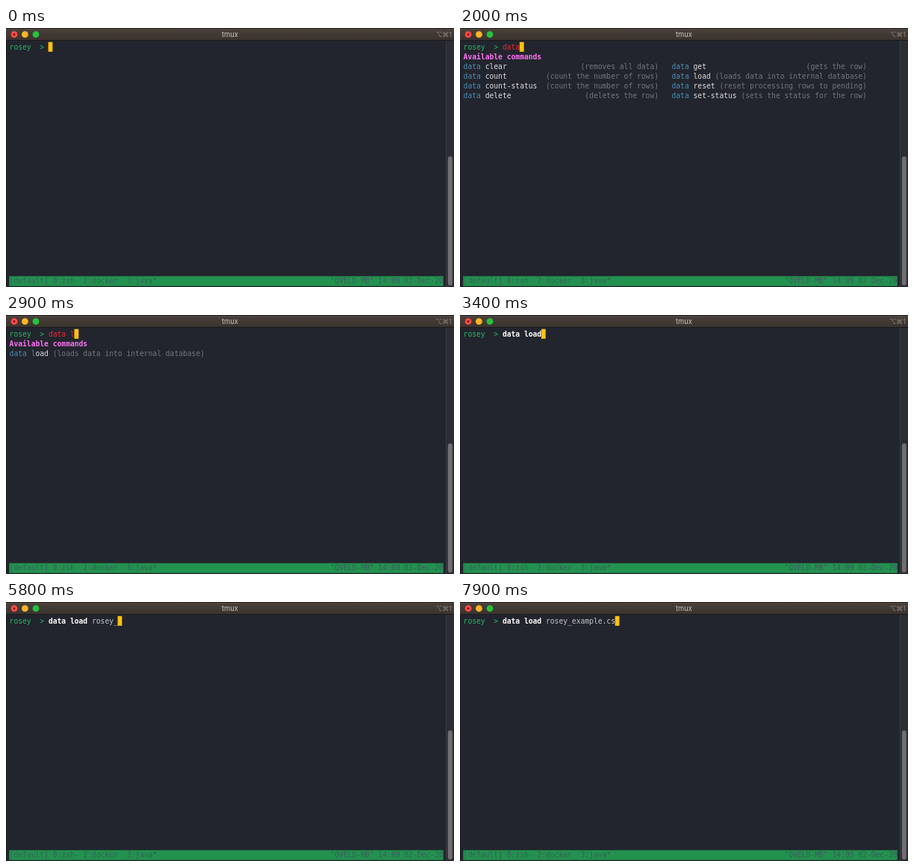
Animation, 600 px wide and 347 px high, one loop 8 s. Source, as an HTML page with a canvas:

```html
<!DOCTYPE html>
<html lang="en">
<head>
<meta charset="utf-8">
<title>Terminal</title>
<style>
  html, body { margin: 0; width: 100%; height: 100%; overflow: hidden; background: #22252d; }
  canvas { display: block; width: 600px; height: 347px; }
</style>
</head>
<body>
<canvas id="stage"></canvas>
<script>
const W = 600, H = 347, LOOP = 8000;
const LEFT = 4.6, TOP = 19, CELL_W = 5.81, CELL_H = 13.06, BASE = 9.8;
const MONO = '"DejaVu Sans Mono", monospace';
const PROMPT = 'rosey  > ';
const COMMAND = 'data load';
const LINE = COMMAND + ' rosey_example.cs';

// Moment of each keystroke in LINE
const KEYS = [
  1500, 1700, 1900, 2000, 2200,
  2900, 3000, 3100, 3300, 3900,
  4200, 4800, 4900, 5100, 5300, 5800,
  6000, 6300, 6400, 6600, 6700, 6900, 7000,
  7300, 7600, 7900
];
const LIST_FROM = 1600, LIST_TO = 3400;

const HELP = [
  ['clear', 'removes all data'],
  ['get', 'gets the row'],
  ['count', 'count the number of rows'],
  ['load', 'loads data into internal database'],
  ['count-status', 'count the number of rows'],
  ['reset', 'reset processing rows to pending'],
  ['delete', 'deletes the row'],
  ['set-status', 'sets the status for the row']
].map(([name, info]) => ['data ' + name, '(' + info + ')']);

const COLOR = {
  back: '#22252d', prompt: '#29b765', cursor: '#ffc20e', error: '#f0283c',
  heading: '#ff70f5', match: '#4b8db5', name: '#dfe0e2', info: '#73767b',
  bold: '#ffffff', plain: '#c5c7ca', status: '#23924f', statusText: '#365f5c'
};

const canvas = document.getElementById('stage');
const ctx = canvas.getContext('2d');
const ratio = window.devicePixelRatio || 1;
canvas.width = W * ratio;
canvas.height = H * ratio;
ctx.scale(ratio, ratio);

function box(x, y, w, h, fill) {
  ctx.fillStyle = fill;
  ctx.fillRect(x, y, w, h);
}

function disc(x, y, r, fill) {
  ctx.fillStyle = fill;
  ctx.beginPath();
  ctx.arc(x, y, r, 0, Math.PI * 2);
  ctx.fill();
}

// Writes on the character grid and returns the next free column
function write(text, col, row, color, bold = false) {
  ctx.font = (bold ? 'bold ' : '') + '9.65px ' + MONO;
  ctx.textAlign = 'left';
  ctx.fillStyle = color;
  const y = TOP + row * CELL_H + BASE;
  for (const ch of text) {
    if (ch !== ' ') ctx.fillText(ch, LEFT + col * CELL_W, y);
    col++;
  }
  return col;
}

function drawWindow() {
  box(0, 0, W, H, COLOR.back);

  const bar = ctx.createLinearGradient(0, 0, 0, 17);
  bar.addColorStop(0, '#4a413b');
  bar.addColorStop(1, '#3a322d');
  box(0, 0, W, 17, bar);
  box(0, 0, W, 1, '#1f1b19');
  box(0, 1, W, 1, '#564c46');
  box(0, 16, W, 1, '#1c1a1b');

  disc(11, 8.7, 4.4, '#fc4b48');
  disc(11, 8.7, 1.4, '#7c0b0b');
  disc(25.4, 8.7, 4.4, '#fdb527');
  disc(40, 8.7, 4.4, '#25c23c');

  ctx.textAlign = 'center';
  ctx.fillStyle = '#cbc5c1';
  ctx.font = '9.4px Inter, sans-serif';
  ctx.fillText('tmux', 300, 12.4);
  ctx.textAlign = 'right';
  ctx.fillStyle = '#8d847e';
  ctx.font = '9px Inter, "DejaVu Sans", sans-serif';
  ctx.fillText('⌥⌘1', 597, 12);

  box(589, 17, 11, H - 17, '#2b2d33');
  box(589, 17, 1, H - 17, '#3a3c41');
  ctx.fillStyle = '#706e71';
  ctx.beginPath();
  ctx.roundRect(591.8, 172, 6, 173, 3);
  ctx.fill();
  box(0, 17, 1, H - 17, '#191b20');
}

function drawStatus() {
  box(4.3, 332.5, 581.4, 13.2, COLOR.status);
  write('[default] 0:zsh- 2:docker  3:java*', 0, 24, COLOR.statusText);
  write('"QVELD-MB" 14:09 02-Dec-20', 74, 24, COLOR.statusText);
}

function drawList(typed) {
  write('Available commands', 0, 1, COLOR.heading, true);
  HELP.filter(([name]) => name.startsWith(typed)).forEach(([name, info], i) => {
    const start = (i % 2) * 48;
    const row = 2 + Math.floor(i / 2);
    const col = write(typed, start, row, COLOR.match);
    write(name.slice(typed.length), col, row, COLOR.name);
    write(info, start + 45 - info.length, row, COLOR.info);
  });
}

function drawInput(typed) {
  let col = write(PROMPT, 0, 0, COLOR.prompt);
  if (typed.startsWith(COMMAND)) {
    col = write(COMMAND, col, 0, COLOR.bold, true);
    col = write(typed.slice(COMMAND.length), col, 0, COLOR.plain);
  } else {
    col = write(typed, col, 0, COLOR.error);
  }
  box(LEFT + col * CELL_W - 0.3, TOP - 0.2, 5.8, 13, COLOR.cursor);
}

function draw(now) {
  const t = now % LOOP;
  const typed = LINE.slice(0, KEYS.filter(k => k <= t).length);
  drawWindow();
  drawStatus();
  if (t >= LIST_FROM && t < LIST_TO) drawList(typed);
  drawInput(typed);
}

const begin = performance.now();
function tick() {
  draw(performance.now() - begin);
  requestAnimationFrame(tick);
}
tick();
</script>
</body>
</html>
```
